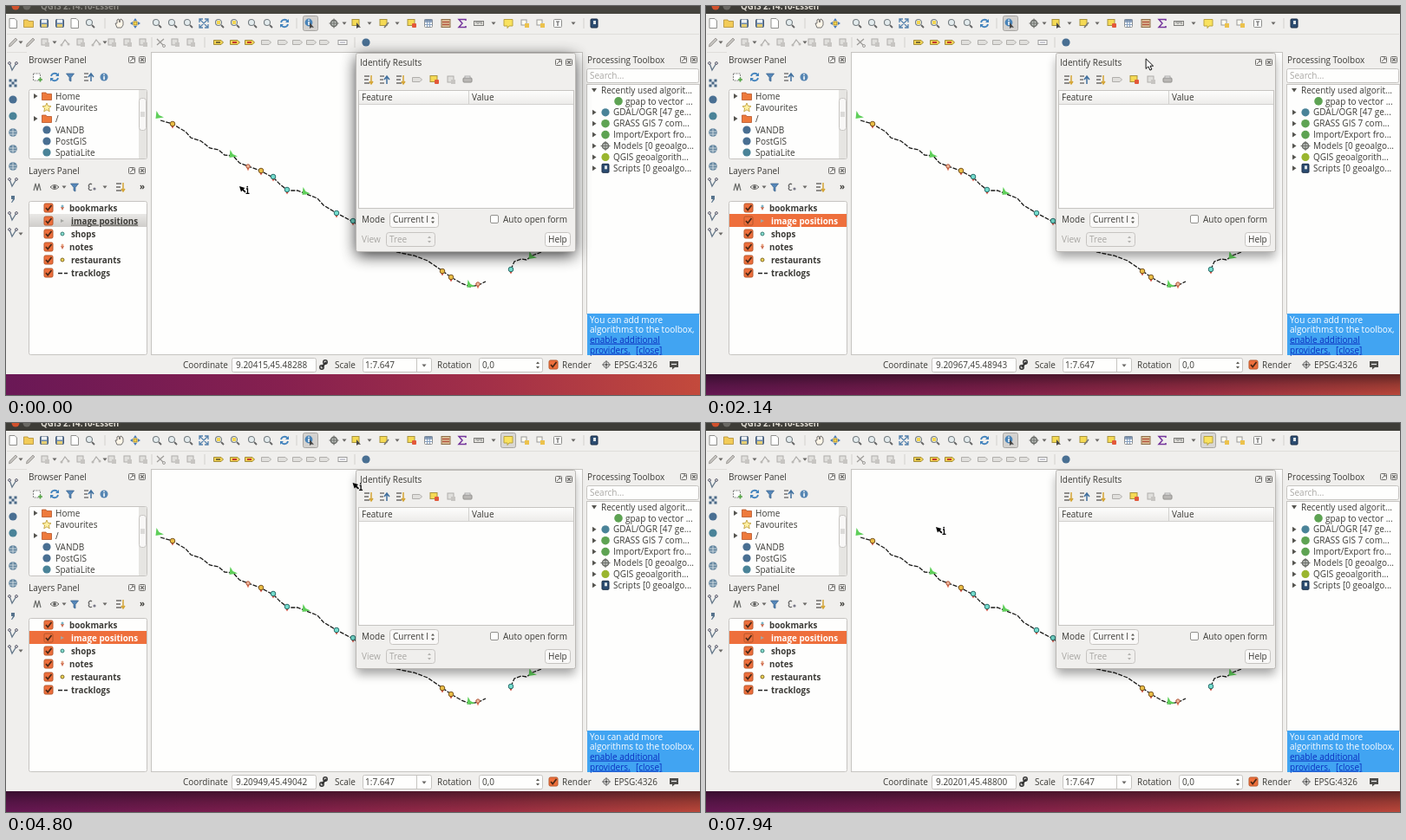
An HTML page that plays this animation: 800x449 px, repeating every 8000 ms.

```html
<!DOCTYPE html>
<html lang="en">
<head>
<meta charset="utf-8">
<title>Map tips</title>
<style>
html, body { margin: 0; width: 100%; height: 100%; overflow: hidden; background: #f0efed; }
svg { display: block; width: 100vw; height: 100vh; }
text { font: 10px "Open Sans", "Noto Sans", sans-serif; fill: #3c3b37; white-space: pre; }
.b { font-weight: 700; font-size: 9.8px; }
.dim { fill: #a9a7a4; }
.link { fill: #0b2fc0; text-decoration: underline; }
</style>
</head>
<body>
<svg id="stage" viewBox="0 0 800 449" preserveAspectRatio="none"></svg>
<script>
const PANEL = '#f0efed', PAPER = '#fefefd', EDGE = '#c6c4c1', ORANGE = '#ee6f3c';

const path = (d, fill = 'none', stroke = 'none', w = 1) =>
  `<path d="${d}" fill="${fill}" stroke="${stroke}" stroke-width="${w}"/>`;
const box = (x, y, w, h, fill, stroke = 'none', r = 0, extra = '') =>
  `<rect x="${x}" y="${y}" width="${w}" height="${h}" fill="${fill}" stroke="${stroke}" rx="${r}" ${extra}/>`;
const dot = (x, y, r, fill, stroke = 'none', w = 1) =>
  `<circle cx="${x}" cy="${y}" r="${r}" fill="${fill}" stroke="${stroke}" stroke-width="${w}"/>`;
const text = (x, mid, s, attrs = '') => `<text x="${x}" y="${mid + 3.6}" ${attrs}>${s}</text>`;
const field = (x, y, w, h, fill = PAPER, r = 2) => box(x + .5, y + .5, w - 1, h - 1, fill, EDGE, r);

// Small pictures, all centred on 0,0
const lens = path('M2 2L5 5', 'none', '#666', 1.8) + dot(-1, -1, 3.5, '#e4ecee', '#757d80', 1.1);
const sheet = box(-4.5, -4.5, 9, 9, '#fbfbfa', '#8f8f8d', 1);
const pointer = path('M0 -1L0 6L2 4.5L5 5Z', '#444');
const selection = box(-5, -4.5, 8, 7, '#f5da55', '#a8943f');
const label = path('M-5.5 -2.5H3L5.5 0L3 2.5H-5.5Z', '#f3d452', '#a08a3a');
const icons = {
  page: path('M-4 -5.5H2L4.5 -3V5.5H-4Z', '#fff', '#8f8f8d'),
  folder: path('M-5.5 4.5V-4H-1L0 -2.5H5.5V4.5Z', '#f2cb58', '#b08d34', .8),
  home: path('M-5.5 4.5V-4H-1L0 -2.5H5.5V4.5Z', '#ee7a3c', '#b5562a', .8),
  disk: box(-4.5, -4.5, 9, 9, '#6d89ab', '#46566c', 1) + box(-3, -4.5, 6, 4, '#eef2f4') + box(-3, 1, 6, 3.5, '#e6cf74'),
  hand: path('M-3 5L-5 0L-3 0V-4L-1 -5L0 -1L1 -5L3 -4L4 -2V2L2 5Z', '#fff6e8', '#666', .9),
  pan: path('M0 -6L2 -3H-2ZM0 6L2 3H-2ZM-6 0L-3 -2V2ZM6 0L3 -2V2Z', '#4a7cb8') + box(-2, -2, 4, 4, '#f3d64c', '#a58a30', 0),
  zoom: lens,
  zoomsel: lens + box(-3, -3, 4, 4, '#f3d650'),
  full: path('M-5 -1V-5H-1M1 -5H5V-1M5 1V5H1M-1 5H-5V1M-5 -5L5 5M5 -5L-5 5', 'none', '#5582ad', 1.3),
  fresh: path('M-4 -1A4.2 4.2 0 0 1 3.5 -2.5M4 1A4.2 4.2 0 0 1 -3.5 2.5', 'none', '#4283bd', 1.8) +
    path('M5 -5V-1H1ZM-5 5V1H-1Z', '#4283bd'),
  info: dot(-1, -1, 4.4, '#4a84b8') + box(-1.7, -2, 1.5, 4, '#fff') + dot(-1, -3.6, .8, '#fff') + pointer,
  about: dot(0, 0, 4.5, '#5585b2') + box(-.7, -1, 1.5, 4, '#fff') + dot(0, -2.6, .8, '#fff'),
  select: selection + pointer,
  clear: selection + box(0, 0, 5, 5, '#e2583a', 'none', 1),
  expr: selection + path('M0 5L5 -1', 'none', '#777', 1.6),
  table: sheet + path('M-4.5 -1.5H4.5M-4.5 1.5H4.5M-1.5 -4.5V4.5M1.5 -4.5V4.5', 'none', '#7f9abb', .9) + box(-4.5, -4.5, 9, 2.2, '#7189a8'),
  abacus: box(-5, -4.5, 10, 9, '#dcc39b', '#8d6e48') + path('M-4 -1.5H4M-4 1.5H4', 'none', '#b5543f', 1.5),
  sigma: path('M4 -3V-4.5H-4L0 0L-4 4.5H4V3', 'none', '#75359c', 1.5),
  ruler: box(-5.5, -2.5, 11, 5, '#e2e1dc', '#7d7c79') + path('M-3 -2V0M-1 -2V1M1 -2V0M3 -2V1', 'none', '#666', .8),
  tip: path('M-5 -4.5H5V3H1L-1 5.5V3H-5Z', '#f9e25e', '#bba33c'),
  mark: box(-4, -4, 6, 6, '#fdfcf2', '#999') + path('M0 0H5V5H0Z', '#ecc24c'),
  note: sheet + path('M-2 -2H2M0 -2V3', 'none', '#666', 1.2),
  book: box(-4, -5, 8, 10, '#2c4d72', '#1b2d45', 1) + box(-1, -3, 3, 4, '#dce3e6'),
  pen: path('M-4.5 5L-4 2L3 -5L5 -3L-2 4Z', '#c3c1bd', '#969490', .8),
  cut: path('M-4 -4L3 3M-4 3L4 -4', 'none', '#9d9b98', 1.2) + dot(4, 4, 1.5, 'none', '#9d9b98'),
  grey: box(-4, -4, 7, 7, '#e0dfdc', '#b0aeab') + path('M0 0H5V5H0Z', '#c7c5c2'),
  node: path('M-4 3L0 -3L4 2', 'none', '#acaaa7', 1.2) + dot(-4, 3, 1.5, '#bab8b5') + dot(4, 2, 1.5, '#bab8b5'),
  tag: label + path('M-3 0H2', 'none', '#5d532e', 1.6),
  redtag: label + path('M-3 0H2', 'none', '#c43a30', 2),
  fade: path('M-5.5 -2.5H3L5.5 0L3 2.5H-5.5Z', '#e0dfdc', '#b0aeab'),
  csw: box(-5, -2.5, 10, 5, '#fbfbfa', '#999') + path('M-3 0H3', 'none', '#99a'),
  dd: path('M-2.5 -1.5H2.5L0 1.8Z', '#6a6966'),
  sep: path('M0 -6V6', 'none', '#d2d0cd'),
  vec: path('M-4 -4L-1 4L4 -4', 'none', '#627688', 1.3) + dot(-4, -4, 1.4, '#fff', '#556') + dot(4, -4, 1.4, '#fff', '#556'),
  raster: box(-4.5, -4.5, 9, 9, '#e2e7ea') + path('M-4.5 -4.5H-1.5V-1.5H1.5V-4.5H4.5V-1.5H1.5V1.5H4.5V4.5H1.5V1.5H-1.5V4.5H-4.5V1.5H-1.5V-1.5H-4.5Z', '#4a6885'),
  logo: dot(0, 0, 4.6, '#496f92'),
  teal: dot(0, 0, 4.6, '#4a8398'),
  green: dot(0, 0, 4.8, '#5ea353'),
  lime: dot(0, 0, 4.6, '#9ab62f'),
  globe: dot(0, 0, 4.8, '#64869f') + path('M-4 -1H4M-4 2H4M0 -4.5V4.5', 'none', '#dfe6ea', .8),
  comma: path('M-2 -4H2V0L-1 4H-2L0 0H-2Z', '#57738c'),
  gear: dot(0, 0, 3.6, '#c2c6c2', '#6c6e6a', 1.6) + path('M-5.5 0H5.5M0 -5.5V5.5', 'none', '#6c6e6a'),
  star: path('M0 -5L1.5 -1.6L5 -1.3L2.4 1L3.2 4.8L0 2.8L-3.2 4.8L-2.4 1L-5 -1.3L-1.5 -1.6Z', '#fff0a0', '#c2a240', .9),
  funnel: path('M-4.5 -4H4.5L1 .5V5L-1 4V.5Z', '#5586b8', '#3a638c', .7),
  add: box(-4.5, -4, 8, 8, '#fff', '#858583', 0, 'stroke-dasharray="2 1"') + path('M1 3H6M3.5 .5V5.5', 'none', '#55a546', 1.7),
  up: path('M-5 -4H0M-5 0H-1M-5 4H0', 'none', '#777', 1.3) + path('M3 5V-3M0 0L3 -4L6 0', 'none', '#40709f', 1.5),
  expand: path('M-5 -4H1M-5 0H0M-5 4H1', 'none', '#6c6b68', 1.3) + path('M3 -5V4M1 2L3 5L5 2', 'none', '#d4a536', 1.5),
  eye: path('M-5 0Q0 -5 5 0Q0 5 -5 0Z', '#eae9e6', '#666562') + dot(0, 0, 1.8, '#555'),
  style: path('M-4 4L-2 -4L0 4L2 -4L4 4', 'none', '#6d6f6c', 1.2),
  eps: path('M1 -3A2 2 0 1 0 -2 0A2 2 0 1 0 1 3', 'none', '#666', 1.2) + dot(4, 2, 1.6, '#778'),
  print: box(-5, -2, 10, 5, '#bab8b5', '#908e8b', 1) + box(-3, -4, 6, 2, '#f0efed', '#aaa'),
  float: box(-3.5, -3.5, 7, 7, 'none', '#6e6d6a', 1) + path('M-2 2L2 -2M0 -2H2V0', 'none', '#6e6d6a'),
  close: box(-3.5, -3.5, 7, 7, 'none', '#6e6d6a', 1) + path('M-2 -2L2 2M2 -2L-2 2', 'none', '#6e6d6a', 1.3),
  tri: path('M-2 -3L2.5 0L-2 3Z', '#55544f'),
  open: path('M-3 -2H3L0 2.5Z', '#55544f'),
  check: box(-5, -5, 10, 10, ORANGE, '#b5562a', 1.5) + path('M-3 0L-.8 2.6L3.5 -3', 'none', '#4a2817', 1.7),
  spin: path('M-2 -1.5H2L0 -4ZM-2 1.5H2L0 4Z', '#55544f'),
  link: path('M-2 3L3 -3', 'none', '#333', 2) + dot(-2, 3, 2.2, 'none', '#333', 1.5) + dot(2, -3, 2.2, 'none', '#333', 1.5),
  crs: dot(0, 0, 3.4, 'none', '#666') + path('M-5 0H5M0 -5V5', 'none', '#666') + dot(0, 0, 1.2, '#555'),
  bubble: path('M-5 -4H5V3H1L-2 5.5V3H-5Z', '#4e4d4a') + path('M-3 -.5H3', 'none', '#eee', 1.2),
  // map symbols
  arrow: path('M-3.5 -5L-.5 0L5 2.5L-4.5 4Z', '#5fcf5a'),
  food: path('M-2.5 1L0 5.5L2.5 1Z', '#cf4535') + dot(0, 0, 2.8, '#e9bd45', '#7b5826'),
  shop: path('M-2.5 1L0 5.5L2.5 1Z', '#cf4535') + dot(0, 0, 2.8, '#74dccd', '#2b6f6c'),
  memo: path('M-2.5 -2H2.5L0 4.5Z', '#d95a3a') + dot(0, -1, 2.2, '#f0bda2', '#ad5538')
};
const at = (name, x, y) => `<g transform="translate(${x} ${y})">${icons[name]}</g>`;
const row = (y, list) => list.replace(/([a-z]+)(\d+) ?/g, (_, n, x) => at(n, x, y));
const col = (x, list) => list.replace(/([a-z]+)(\d+) ?/g, (_, n, y) => at(n, x, y));
const pins = (name, pts) => pts.split(' ').map(p => at(name, ...p.split(','))).join('');

const toolbars =
  row(20, 'page8 folder26 disk44 disk62 page79 zoom97 sep114 hand131 pan149 zoom174 zoom192 zoom210 full228 zoomsel246 zoomsel264 zoom284 zoom302 fresh321 sep335') +
  box(342.5, 11.5, 17, 17, '#d4d2cf', '#a8a6a3', 2) +
  row(20, 'info350 gear378 dd390 select404 dd419 expr436 dd451 clear468 table487 abacus507 sigma526 ruler545 dd562') +
  row(20, 'mark598 mark616 note636 dd654 sep666 book678') +
  row(42, 'pen8 dd17 pen28 grey45 dd56 node68 grey86 node104 dd114 grey122 grey140 grey158 sep168 cut178 grey195 grey213 sep229') +
  row(42, 'tag245 redtag264 redtag281 fade300 fade319 fade336 fade352 fade367 csw388 sep402 logo415') +
  col(8, 'vec70 raster89 logo108 teal127 globe146 globe165 globe185 vec204 comma223 vec243 vec262') + at('dd', 17, 263) +
  path('M1 32.5H799M1 53.5H24', 'none', '#dfddda');

const browser = text(26, 62, 'Browser Panel') + row(62, 'float145 close157') +
  row(82, 'add36 fresh56 funnel74 up95 about113') + field(26, 96, 137, 81) +
  ['Home', 'Favourites', '/', 'VANDB', 'PostGIS', 'SpatiaLite'].map((s, i) =>
    text(57, 104 + 13 * i, s) + at(['home', 'star', 'home', 'logo', 'logo', 'teal'][i], 47, 104 + 13 * i)).join('') +
  col(34, 'tri104 tri130') + box(153, 97, 9, 79, '#e6e5e2') + field(153, 106, 9, 38, '#f8f7f6', 3) +
  path('M155 123H160M155 125H160M155 127H160', 'none', '#b0aeab', .8);

const layerNames = ['bookmarks', 'image positions', 'shops', 'notes', 'restaurants', 'tracklogs'];
const layers = text(26, 190, 'Layers Panel') + row(190, 'float145 close157') +
  row(209, 'style36 eye56 dd67 funnel79 eps98 dd114 expand132') + text(154, 208, '»', 'class="b"') +
  field(26, 225, 137, 178) +
  box(27, 240, 135, 15, 'url(#idle)', 'none', 0, 'id="rowBg"') +
  layerNames.map((s, i) => {
    const y = 233 + 15 * i, extra = i === 1 ? ' id="rowText"' : '';
    return at('check', 49, y) + text(i === 0 || i === 3 ? 73 : 75, y, s, 'class="b"' + extra);
  }).join('') +
  path('M63 232H67L65 236ZM63 277H67L65 281Z', '#cc6a4e') + dot(65, 231, 1.5, '#78b4c6') + dot(65, 276, 1.5, '#e7a685') +
  path('M63 246L67 248L63 250Z', '#a3a5a0') + dot(65, 263, 2, '#84dccd', '#3a7d75') +
  dot(65, 293, 2, '#f0d650', '#80682a') + path('M60 308.5H65M67 308.5H71', 'none', '#222', 1.4);

const track = 'M178 132L192 136L200 141L207 145L213 152L225 156L235 164L245 166L252 172L262 173L269 181L279 185L293 190L308 198L316 206L325 213L336 213L346 217L359 222L366 230L381 239L400 249L450 284L470 288L486 294L502 305L513 313L525 320L535 324L545 322L553 318M582 304L586 295L594 292L600 293L607 288L617 284';
const map = field(167, 53, 498, 350, PAPER, 0) +
  `<path d="${track}" fill="none" stroke="#1a1a18" stroke-width="1.3" stroke-dasharray="5 1.5"/>` +
  pins('arrow', '177,126 262,171 346,214 536,321 607,288') + pins('food', '192,136 294,190 503,306 513,313') +
  pins('shop', '308,197 324,212 381,239 400,248 582,304') + pins('memo', '279,186 544,322');

const tools = ['Recently used algorit...', 'gpap to vector ...', 'GDAL/OGR [47 ge...', 'GRASS GIS 7 com...',
  'Import/Export fro...', 'Models [0 geoalgo...', 'QGIS geoalgorith...', 'Scripts [0 geoalgo...'];
const toolIcons = [, 'green', 'teal', 'green', 'green', 'gear', 'lime', 'book'];
const toolbox = text(670, 62, 'Processing Toolbox') + row(62, 'float781 close793') +
  field(669, 72, 130, 17) + text(673, 80, 'Search...', 'class="dim"') + field(669, 90, 131, 266, PAPER, 0) +
  tools.map((s, i) => {
    const y = 97 + 12.9 * i;
    return text([686, 714][i] || 700, y, s) + (i ? at(toolIcons[i], i === 1 ? 706 : 691, y) : '') +
      (i === 1 ? '' : at(i ? 'tri' : 'open', 678, y));
  }).join('') +
  box(670, 355, 129, 48, '#41a4f2') + text(673, 362, 'You can add more', 'style="fill:#fff"') +
  text(673, 373.5, 'algorithms to the toolbox,', 'style="fill:#fff"') + text(673, 385, 'enable additional', 'class="link"') +
  text(673, 397, 'providers.', 'class="link"') + text(726, 397, '[close]', 'class="link"');

const status = text(-1, 414, 'how information about a feature when', 'id="hint"') +
  text(204, 414, 'Coordinate') + field(260, 406, 98, 17) + text(265, 414.5, '', 'id="coord"') + at('link', 366, 414) +
  text(379, 414, 'Scale') + field(411, 406, 80, 17) + text(414, 414.5, '1:7.647') +
  path('M473.5 407V422', 'none', EDGE) + at('dd', 482, 415) + text(497, 414, 'Rotation') +
  field(545, 406, 74, 17) + text(549, 414.5, '0,0') + at('spin', 613, 414.5) + at('check', 631, 414) +
  text(641, 414, 'Render') + at('crs', 692, 414) + text(701, 414, 'EPSG:4326') + at('bubble', 770, 414);

const dialog = box(404, 55, 252, 229, '#000', 'none', 2, 'id="shade"') + box(403.5, 54.5, 253, 229, PANEL, '#bab8b5', 2) +
  text(408, 65.5, 'Identify Results') + row(65, 'float637 close649') +
  row(85, 'expand418 up436 expand455 fade474 clear494 grey513 print532') +
  field(406, 97, 249, 137, PAPER, 0) + box(407, 98, 247, 15, 'url(#head)') + path('M407 113.5H654M533.5 98V113', 'none', '#d2d1ce') +
  text(410, 105, 'Feature') + text(537, 105, 'Value') +
  text(410, 246.5, 'Mode') + field(442, 238, 57, 18, '#faf9f8', 3) + text(446, 246.5, 'Current l') + at('spin', 492, 247) +
  text(410, 269, 'View', 'class="dim"') + field(438, 261, 57, 17, PANEL, 3) + text(442, 269, 'Tree', 'class="dim"') +
  `<g opacity=".4">${at('spin', 488, 269.5)}</g>` +
  box(558.5, 241.5, 9, 9, PAPER, '#92918e', 1.5) + text(573, 246, 'Auto open form') +
  field(621, 261, 30, 17, '#faf9f8', 3) + text(625, 269, 'Help');

const mapTip = box(179, 138, 133, 55, '#000', 'none', 0, 'filter="url(#soft)"') + box(179, 137, 133, 55, '#000') +
  text(181, 145, 'IMG_20170314_153426.jpg', 'style="fill:#fff"') +
  box(181, 151, 69, 38, '#8f8f84') + path('M181 151H212L200 168L194 186L181 189Z', '#d5e6e8') +
  path('M181 180L196 172L194 189H181Z', '#7c8680') + path('M203 165L226 163L229 176L205 178Z', '#b3ab98', '#75705f', .7) +
  path('M229 164H250V189H232Z', '#4c5f4a') + path('M188 161Q195 154 203 160L250 157V164L204 166Q194 171 188 161Z', '#3f9160') +
  path('M200 184L228 178V189H198Z', '#77736a');

const desktop = box(0, 420, 800, 29, 'url(#wall)') + box(0, 425, 800, 24, 'url(#drop)', 'none', 0, 'id="windowShade"');
const frame = box(0, 0, 800, 425, PANEL) + box(0, 0, 800, 9, '#3d3c37', 'none', 0, 'id="bar"') +
  dot(11, 0, 4.5, '#d2512c') + dot(24, 0, 4.5, '#6a6964') +
  '<text id="title" class="b" x="40" y="4">QGIS 2.14.10-Essen</text>';

const grad = (id, stops, down) => `<linearGradient id="${id}" ${down ? 'x2="0" y2="1"' : ''}>` +
  stops.map(([o, c, a = 1]) => `<stop offset="${o}" stop-color="${c}" stop-opacity="${a}"/>`).join('') + '</linearGradient>';
const blur = (id, dev, dy, a) => `<filter id="${id}" x="-20%" y="-30%" width="140%" height="170%">` +
  `<feGaussianBlur stdDeviation="${dev}"/><feOffset dy="${dy}"/><feComponentTransfer><feFuncA type="linear" slope="${a}"/></feComponentTransfer></filter>`;

const stage = document.getElementById('stage');
stage.innerHTML = '<defs>' +
  grad('wall', [[0, '#6a1856'], [.4, '#86204f'], [.7, '#a33048'], [1, '#c34a3c']]) +
  grad('drop', [[0, '#100810', .55], [.5, '#100810', .25], [1, '#100810', .05]], true) +
  grad('idle', [[0, '#e9e8e6'], [1, '#cfcdca']], true) + grad('head', [[0, '#fdfdfc'], [1, '#edecea']], true) +
  blur('wide', 9, 4, .8) + blur('slim', 6, 6, .36) + blur('soft', 5, 5, .35) + '</defs>' +
  desktop + frame + toolbars +
  `<g id="tipButton">${box(570.5, 11.5, 17, 17, '#d9d7d4', '#a8a6a3', 2)}</g>` + at('tip', 579, 20) +
  browser + layers + map + toolbox + status + dialog + `<g id="mapTip">${mapTip}</g>` +
  '<g id="cursor"><g id="plain">' + path('M0 0V11.5L2.8 9L4.8 13.2L6.8 12.2L4.9 8.3H8.5Z', '#fff', '#111') + '</g><g id="identify">' +
  path('M0 0L6.5 2L4.8 3.5L7.5 6.2L6.2 7.5L3.5 4.8L2 6.5Z', '#000') +
  path('M8 3H9.5V8M7.5 8.3H11.5', 'none', '#000', 1.3) + dot(9.2, .7, .9, '#000') + '</g></g>';

const el = {};
for (const n of stage.querySelectorAll('[id]')) el[n.id] = n;
const show = (n, on) => n.setAttribute('opacity', +on);
const clamp = v => Math.max(0, Math.min(1, v));

// time, pointer x, y, longitude, latitude
const keys = [
  [60, 269, 208, 9.20415, 45.48288],
  [660, 147, 247, 9.19712, 45.48248],
  [1180, 147, 247, 9.19712, 45.48248],
  [1740, 503, 63, 9.20967, 45.48943],
  [2080, 503, 63, 9.20967, 45.48943],
  [2140, 507, 61, 9.20967, 45.48943],
  [2940, 578, 21, 9.20967, 45.48943],
  [3800, 578, 21, 9.20967, 45.48943],
  [4540, 400, 69, 9.20951, 45.49043],
  [4800, 400, 69, 9.20951, 45.49043],
  [5600, 179, 127, 9.19763, 45.48730],
  [7260, 179, 127, 9.19763, 45.48730],
  [7600, 235, 98, 9.20060, 45.48897],
  [7940, 265, 120, 9.20201, 45.48800]
];
function pose(t) {
  const i = keys.findIndex(k => k[0] > t);
  if (i === 0) return keys[0];
  if (i < 0) return keys[keys.length - 1];
  const a = keys[i - 1], b = keys[i], u = (t - a[0]) / (b[0] - a[0]), e = Math.sin(u * Math.PI / 2);
  return a.map((v, j) => v + (b[j] - v) * e);
}

function draw(t) {
  const [, x, y, lon, lat] = pose(t);
  const overDialog = x > 403 && x < 657 && y > 54 && y < 284;
  const overMap = x > 167 && x < 665 && y > 53 && y < 403 && !overDialog;
  el.cursor.setAttribute('transform', `translate(${x.toFixed(1)} ${y.toFixed(1)})`);
  show(el.plain, !overMap);
  show(el.identify, overMap);
  el.coord.textContent = lon.toFixed(5) + ',' + lat.toFixed(5);

  const active = t >= 1000, picked = t >= 1060;
  show(el.windowShade, active);
  el.bar.setAttribute('fill', active ? '#3d3c37' : '#45443e');
  el.title.style.fill = active ? '#dfdbd2' : '#8c8a84';
  el.shade.setAttribute('filter', active ? 'url(#slim)' : 'url(#wide)');
  el.rowBg.setAttribute('fill', picked ? ORANGE : 'url(#idle)');
  el.rowText.style.fill = picked ? '#fff' : '#3c3b37';
  el.rowText.style.textDecoration = picked ? 'none' : 'underline';

  show(el.tipButton, t >= 3260 ? 1 : t >= 2820 ? .45 : 0);
  show(el.hint, t >= 2820 && t < 3860);
  show(el.mapTip, clamp((t - 6340) / 300) * clamp((7500 - t) / 240));
}

function tick(now) {
  draw(now % 8000);
  requestAnimationFrame(tick);
}
draw(0);
requestAnimationFrame(tick);
</script>
</body>
</html>
```
